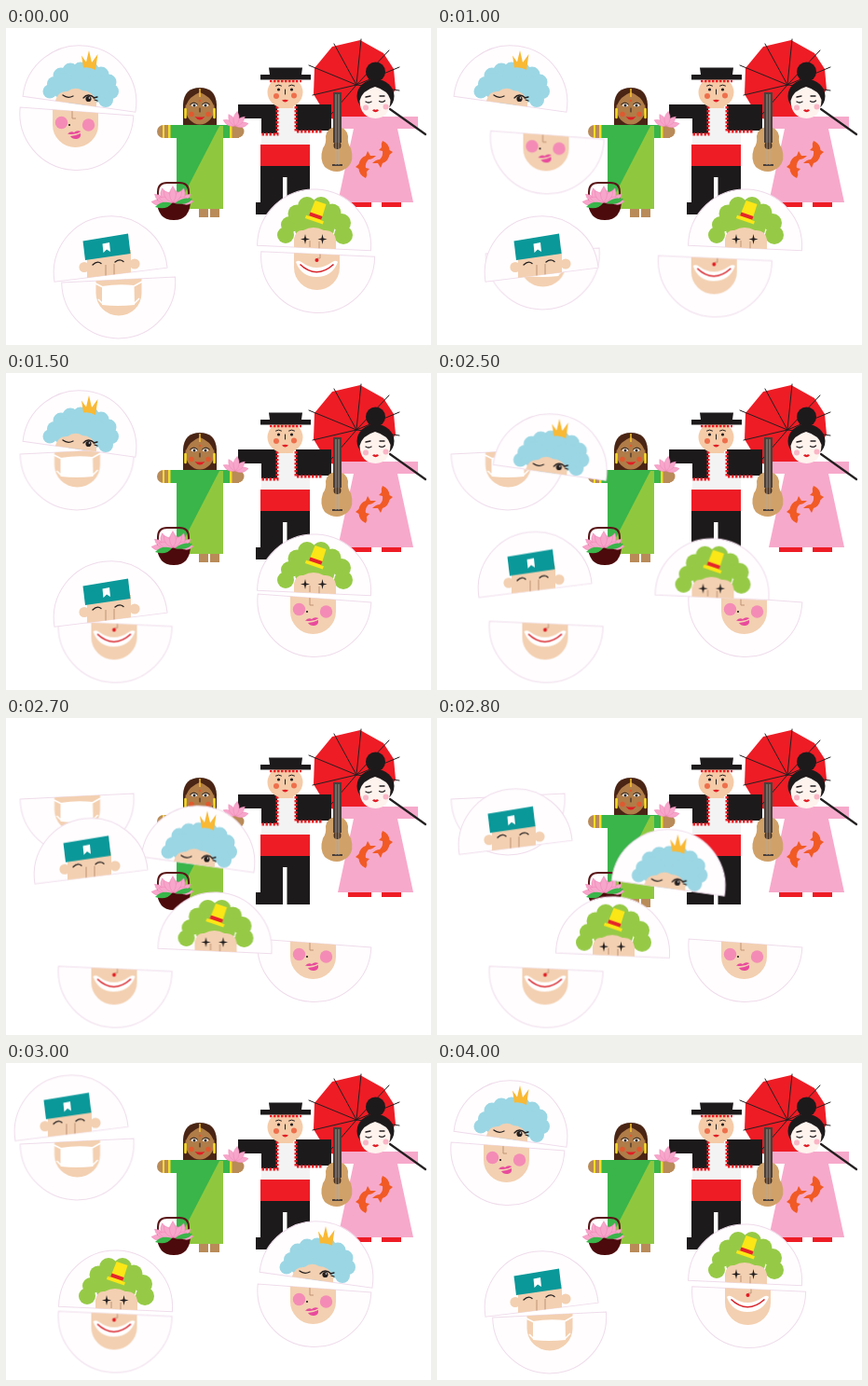
Write an HTML page that moves like this. It is 456 px wide and 340 px high and loops after 5000 ms.

```html
<!DOCTYPE html>
<html lang="en">
<head>
<meta charset="utf-8">
<title>Mix and match faces</title>
<style>
  html, body { margin: 0; width: 100%; height: 100%; overflow: hidden; background: #fff; }
  svg { display: block; width: 100%; height: 100%; }
  .skin { fill: #f3d0b1; }
  .line { fill: none; stroke: #231f20; stroke-width: 1.3; stroke-linecap: round; }
  .thin { stroke-width: 1; }
  .nose { fill: none; stroke: #b98e70; stroke-width: .9; }
  .half { fill: #fffdfe; stroke: #efdceb; stroke-width: 1; }
</style>
</head>
<body>
<svg viewBox="0 0 456 340" xmlns="http://www.w3.org/2000/svg">
  <defs>
    <path id="petal" d="M0 0Q-6-7 0-15Q6-7 0 0Z"/>
    <g id="lotus" fill="#f7a6cb" stroke="#ee85b5" stroke-width=".5">
      <use href="#petal" transform="rotate(-72)"/><use href="#petal" transform="rotate(72)"/>
      <use href="#petal" transform="rotate(-38)"/><use href="#petal" transform="rotate(38)"/>
      <use href="#petal" transform="scale(1.1)"/>
    </g>
    <path id="koi" fill="#f15a24" d="M-1-13Q6-10 6.500-3L10-1L6.500 2Q5 9-1 11L-3 16L-6 11L-12 11Q-8 7-4 7Q0 3-1-2L-5-3L-2-6Q-3-10-1-13Z"/>
    <path id="spark" d="M0-5.5L1 -1L5 0L1 1L0 5.5L-1 1L-5 0L-1-1Z" fill="#231f20"/>
  </defs>

  <g id="umbrella">
    <path fill="#ee1c25" d="M330 71L331 43L350 20L380 13L405 27L416 44L418 66L400 92L372 103L345 96Z"/>
    <path class="line thin" d="M376 61L325 40M376 61L352 17M376 61L381 12M376 61L411 24M376 61L422 42M376 61L422 67M376 61L329 72M376 61L345 97"/>
  </g>

  <g id="geisha">
    <path fill="#ee1c25" d="M367 184h25v8h-25zM403 184h21v8h-21z"/>
    <path fill="#f7a9cb" d="M354 95H442V108H420L437 187H356L373 108H354Z"/>
    <path class="line" style="stroke-width:2.2" d="M412 87L450 114"/>
    <circle cx="396.5" cy="47" r="10.500" fill="#1d1a1b"/>
    <ellipse cx="396.500" cy="73" rx="20" ry="18" fill="#1d1a1b"/>
    <path fill="#fff3ee" d="M379.500 78Q382 67 396 63Q410 67 412.500 77Q412 96 396.500 97Q380 96 379.500 78Z"/>
    <path class="line" d="M386 79q3 2 6 0M400.500 78.500q3 2 6-.5M386 74l5-1M401 73l5 0"/>
    <g fill="#f9b5c6"><circle cx="386" cy="85.500" r="3"/><circle cx="407.500" cy="84.500" r="3"/></g>
    <path fill="#e31b23" d="M393 88.500q2-2 3.500-.5q2-1.500 3.500 .5q-3.500 3.500-7 0z"/>
    <use href="#koi" transform="translate(385 148) rotate(180)"/>
    <use href="#koi" transform="translate(405 134)"/>
  </g>

  <g id="dancer">
    <path fill="#f5cba8" d="M292 80h16v9h-16z"/>
    <path fill="#f4f3f3" d="M274 86h52v40h-52z"/>
    <path fill="#1d1a1b" d="M249 82H291V113H274V97H249ZM311 82H349V110H311Z"/>
    <path d="M291 84V114H274M311 84V111H340" fill="none" stroke="#ee1c25" stroke-width="3" stroke-dasharray="2.500 1.500"/>
    <path fill="#ee1c25" d="M273 125h53v23h-53z"/>
    <path fill="#1d1a1b" d="M273 148H326V200H301.500V160H297V200H268V187H273Z"/>
    <ellipse cx="299.500" cy="69" rx="19" ry="17" fill="#f5cba8"/>
    <path fill="#1d1a1b" d="M282 42.500H318L317 50H327V55.500H273V50H283Z"/>
    <path d="M283 57H317" stroke="#ee1c25" stroke-width="2.500" stroke-dasharray="2.500 1.500"/>
    <path class="line thin" d="M289.500 62q3-2 6 0M303.500 62q3-2 6 0M299.500 66v5"/>
    <g fill="#231f20"><circle cx="292.500" cy="66" r="1.600"/><circle cx="306.500" cy="66" r="1.600"/></g>
    <g fill="#ef6f4c"><circle cx="290" cy="73" r="3"/><circle cx="309" cy="72.500" r="3"/></g>
    <path fill="#e31b23" d="M296 77.500q3.500-1.500 7 0q-3.500 4-7 0z"/>
  </g>

  <g id="guitar">
    <path fill="#d0a168" d="M343 116Q345 106 355 106Q365 106 367 116Q366 124 370 129Q374 142 367 149Q361 154 355 154Q348 154 342 149Q336 141 340 129Q344 124 343 116Z"/>
    <circle cx="355.500" cy="126" r="4" fill="#49301f"/>
    <path fill="#4a3f3a" d="M351 69h9v54h-9zM350 146h11v2h-11z"/>
    <path d="M354 71V147M357 71V147" stroke="#b5aca4" stroke-width=".8"/>
  </g>

  <g id="sari">
    <path fill="#b98b58" d="M169 104H250V118H169A7 7 0 0 1 169 104ZM207 192h10v11h-10zM219 192h10v11h-10z"/>
    <circle cx="249" cy="111" r="6.500" fill="#b98b58"/>
    <path fill="#39b54a" d="M176 104H241V118H233V194H183V118H176Z"/>
    <path fill="#8fc83f" d="M233 105V194H183L229 105Z"/>
    <path fill="#f7dc29" d="M168 104h2v14h-2zM174 104h2.500v14h-2.500zM240 104h2.500v14h-2.500z"/>
    <path fill="#4a2515" d="M190 104V82Q191 64 208 64Q225 64 226 82V104Z"/>
    <ellipse cx="208" cy="86" rx="15.500" ry="17.500" fill="#b07c48"/>
    <path fill="#4a2515" d="M193 83Q197 73 208 69Q219 73 223 83Q226 65 208 65Q190 65 193 83Z"/>
    <path d="M208 65v9" stroke="#f7c52e" stroke-width="1.500"/>
    <path fill="#fff" d="M198.500 83q3.500-4 7 0q-3.500 3-7 0zM210.500 83q3.500-4 7 0q-3.500 3-7 0z"/>
    <path class="line thin" d="M197.500 82q4-4 8 0M210.500 82q4-4 8 0M208 86v4"/>
    <g fill="#231f20"><circle cx="202" cy="83" r="1.500"/><circle cx="214" cy="83" r="1.500"/></g>
    <g fill="#e0592f"><circle cx="199" cy="92.500" r="2.700"/><circle cx="217" cy="92.500" r="2.700"/><circle cx="208" cy="78" r="1.200"/></g>
    <path fill="#e31b23" d="M202.500 95q5.500 1 11 0q-5.500 7-11 0z"/>
    <path d="M192.500 87v9M223.500 87v9" stroke="#f7dc29" stroke-width="2.600" stroke-linecap="round"/>
    <use href="#lotus" transform="translate(246 105) rotate(8) scale(.95)"/>
  </g>

  <g id="basket">
    <path d="M163 189V176Q163 166 173 166H186Q196 166 196 176V189" fill="none" stroke="#5a1617" stroke-width="2"/>
    <path fill="#4c0a0c" d="M162 184H198Q198 206 180 206Q162 206 162 184Z"/>
    <use href="#lotus" transform="translate(171 188) rotate(-12)"/>
    <use href="#lotus" transform="translate(187 187) rotate(14) scale(.95)"/>
    <use href="#lotus" transform="translate(179 187) scale(1.050)"/>
    <path fill="#39b54a" d="M160 192Q167 184 178 188Q172 196 160 192ZM181 188Q190 181 200 183Q195 191 181 188Z"/>
  </g>

  <g id="pieces"></g>
</svg>

<script>
  const dots = (fill, list) => `<g fill="${fill}">` +
    list.map(([x, y, r]) => `<circle cx="${x}" cy="${y}" r="${r}"/>`).join('') + '</g>';
  const path = (d, attrs) => `<path d="${d}" ${attrs}/>`;
  const chin = (x, y, h) =>
    path(`M${x} ${y}v${h - 24}a24.5 24 0 0 0 49 0v${24 - h}z`, 'class="skin"');

  // Each half: chord centre, chord angle, travel, start time and its drawing.
  const halves = [
    { x: 76, y: 89.5, turn: 4.2, dx: 255, dy: 152, start: 1000, art:
      chin(50, 80, 48) +
      dots('#f48bb6', [[59.5, 101.5, 6.7], [88.5, 104, 6.7]]) +
      dots('#231f20', [[68, 104, 1.1]]) +
      path('M71 86V97h4', 'class="nose"') +
      path('M66 113.500q4-3.500 7-1.500q3-3 7.500-1q-6 4.500-14.500 2.500zM69 116q5 0 11-3q1 5-4 6q-5 .5-7-3z', 'fill="#e84a9c"') },

    { x: 334.7, y: 242.5, turn: 2.6, dx: -217.5, dy: 26.5, start: 1000, art:
      chin(309, 232, 49) +
      path('M337 238v9h-3', 'class="nose"') +
      path('M311 251Q313 248.500 317 251Q333 263 350 251Q354 248.500 356 251Q350 267 333 267Q317 267 311 251Z', 'fill="#fff"') +
      path('M315.500 253.500Q333 270 351.500 253.500', 'fill="none" stroke="#d8242b" stroke-width="1.600"') +
      dots('#e31b23', [[333.5, 249, 2]]) },

    { x: 120.6, y: 270, turn: -2.8, dx: -44.5, dy: -186, start: 1000, art:
      chin(96.500, 260, 48.500) +
      path('M96 274L104 278M146 272L137 277M99 291L104 296M143 290L137 296', 'stroke="#fff" stroke-width="1.500"') +
      path('M103 277Q120 274 137.500 276L138 297Q120 299 103 297Z', 'fill="#fff"') },

    { x: 78.5, y: 81.7, turn: 8, dx: 254, dy: 151, start: 2500, art:
      dots('#9bd6e4', [[47, 68, 7.5], [52, 60, 8], [59, 51, 8.5], [69, 46, 8.5], [80, 45, 8.5], [91, 45, 8.5],
        [102, 50, 8.5], [110, 58, 8.5], [113, 68, 8], [107, 77, 8], [78, 62, 22], [96, 65, 15], [62, 62, 14]]) +
      path('M53 92V78Q56 67 66 68Q74 62 82 67Q92 67 97 78V94Z', 'class="skin"') +
      path('M83 42.500L81 29.500L86 36.500L89 24L92 37L98.500 28L96 45Q90 41.500 83 42.500Z', 'fill="#f9b934"') +
      path('M61 72q5 4 11 1M83 75q5-6 12 0M94 75l4-1M95 77l3 1', 'class="line"') +
      dots('#231f20', [[88.5, 76, 3.1]]) + dots('#fff', [[89.5, 75, .8]]) },

    { x: 112.5, y: 264.7, turn: -7.1, dx: -42.1, dy: -188.7, start: 2500, art:
      dots('#f3d0b1', [[84, 256.5, 5.6], [138, 253, 5.6]]) +
      path('M87 244L134 238V275H87Z', 'class="skin"') +
      path('M82.500 228.500L131 220.500L133.500 242L85 249Z', 'fill="#0b9899"') +
      path('M103.500 231.500L111 230L112 240L108 237.500L104.500 241Z', 'fill="#fff"') +
      path('M93 254q5-5 9-1.500M117 251q5-4 9-.5', 'class="line"') +
      path('M107 254v13M116 253v12', 'class="nose"') },

    { x: 330.5, y: 236, turn: 2.6, dx: -213, dy: 28, start: 2500, art:
      dots('#96ca46', [[300, 222, 9], [304, 211, 9], [312, 199, 9.5], [323, 191, 10], [338, 191, 10],
        [350, 198, 9.5], [360, 209, 10], [362, 222, 10], [331, 211, 22]]) +
      path('M309 242V226Q311 216 319 217Q330 211 341 217Q352 216 354 227V244Z', 'class="skin"') +
      `<g transform="translate(331.500 204) rotate(19)">
        <path d="M-6-18H6.500L7 0H10V3.500H-10V0H-7Z" fill="#fbe616"/>
        <path d="M-6.800-4.500H6.900L7-.5H-7Z" fill="#e5252a"/></g>` +
      '<use href="#spark" x="321" y="226.500"/><use href="#spark" x="339.500" y="226.500"/>' +
      path('M326 228v7M336 229v9', 'class="nose"') }
  ];

  const LOOP = 5000, RESET = 4000, MOVE = 600;
  const arc = 'M-61 0A61.03 61.03 0 1 1 61 0Z';

  document.getElementById('pieces').innerHTML = halves.map((h, i) => {
    const flip = h.start === 1000 ? 180 : 0;
    const place = `transform="translate(${h.x} ${h.y}) rotate(${h.turn + flip})"`;
    return `<g class="piece">
      <clipPath id="cut${i}"><path d="${arc}" ${place}/></clipPath>
      <path class="half" d="${arc}" ${place}/>
      <g clip-path="url(#cut${i})">${h.art}</g></g>`;
  }).join('');

  document.querySelectorAll('.piece').forEach((el, i) => {
    const { dx, dy, start } = halves[i];
    const home = 'translate(0px, 0px)', away = `translate(${dx}px, ${dy}px)`;
    const key = (ms, transform, easing = 'step-end') => ({ offset: ms / LOOP, transform, easing });
    el.animate([
      key(0, home),
      key(start, home, 'steps(6, start)'),
      key(start + MOVE, away),
      key(RESET, home),
      key(LOOP, home)
    ], { duration: LOOP, iterations: Infinity });
  });
</script>
</body>
</html>
```
